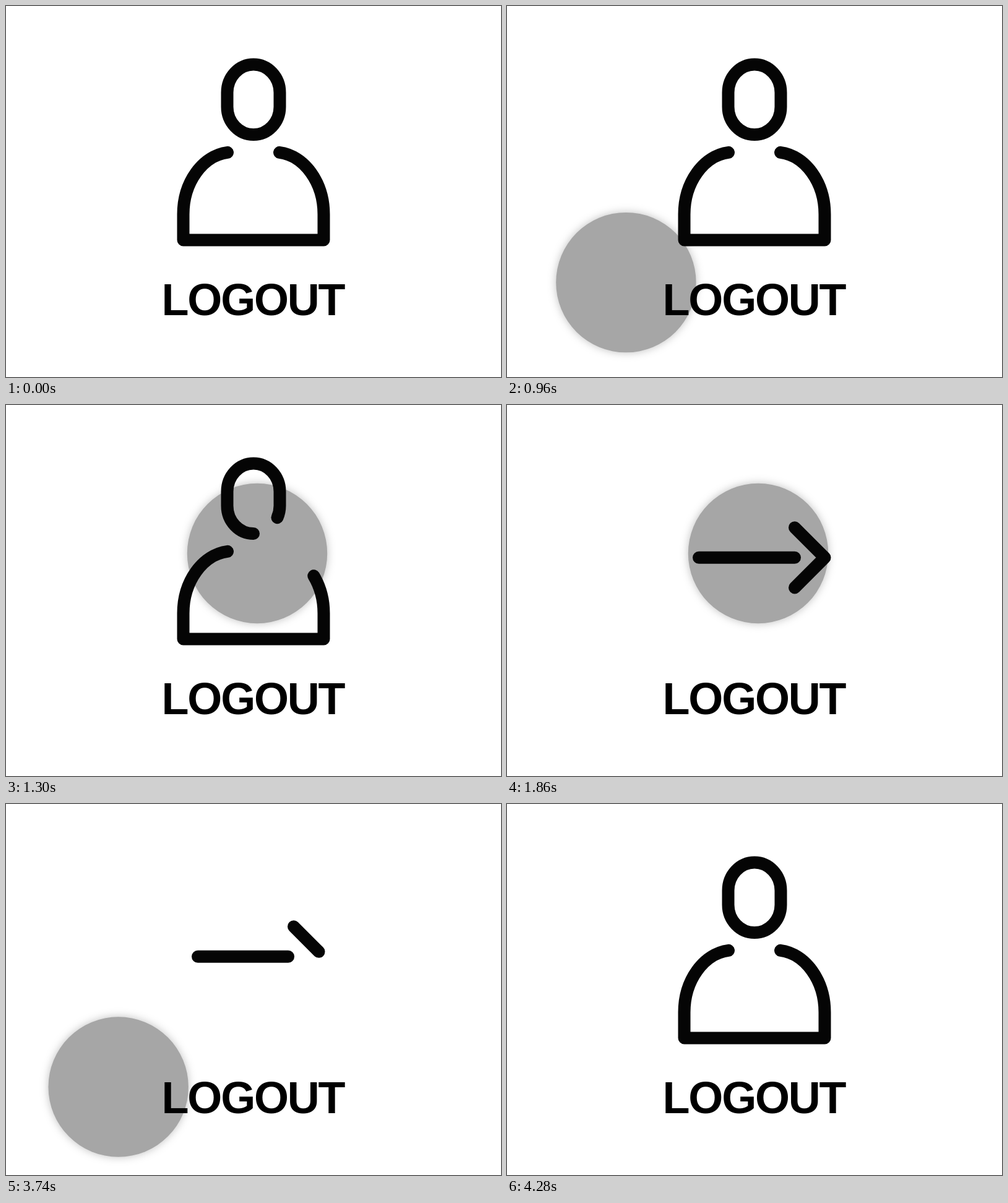
An HTML page that plays this animation: 800x600 px, repeating every 5980 ms.

```html
<!DOCTYPE html>
<html lang="en">
<head>
<meta charset="utf-8">
<title>Logout</title>
<style>
  html, body { margin: 0; width: 100%; height: 100%; overflow: hidden; background: #fff; }
  svg { display: block; width: 100vw; height: 100vh; }
  .line { fill: none; stroke: #050505; stroke-width: 20; stroke-linecap: round; stroke-linejoin: round; }
  text { font: bold 72px "Liberation Sans", Arial, Helvetica, sans-serif; letter-spacing: -2.2px; fill: #000; }
</style>
</head>
<body>
<svg viewBox="0 0 800 600">
  <defs>
    <filter id="soft" x="-25%" y="-25%" width="150%" height="150%" color-interpolation-filters="sRGB">
      <feDropShadow dx="0" dy="0" stdDeviation="7" flood-color="#000" flood-opacity=".25"/>
    </filter>
  </defs>
  <g id="disc"><circle r="113.2" fill="#a6a6a6" filter="url(#soft)"/></g>
  <path class="line" id="head" pathLength="1"
    d="M400 208A42.5 45 0 0 1 357.5 163V140A42.5 45.5 0 0 1 442.5 140V163A42.5 45 0 0 1 400 208"/>
  <path class="line" id="body" pathLength="1"
    d="M358 236.8C318 242 286.5 285 286.5 337V378.5H513.5V337C513.5 285 482 242 442 236.8"/>
  <path class="line" id="shaft" pathLength="1" d="M310 246.8H465"/>
  <path class="line" id="tip" pathLength="1" d="M465 198.2L513.5 246.8L465 295.4"/>
  <text x="251.6" y="500">LOGOUT</text>
</svg>
<script>
  const LOOP = 5980;
  const HALF = 2700; // the arrow rests around this moment
  const $ = id => document.getElementById(id);
  const disc = $('disc'), head = $('head'), body = $('body'), shaft = $('shaft'), tip = $('tip');

  const clamp = v => Math.min(1, Math.max(0, v));
  // share of a stroke that is gone, u ms away from its full state
  const gone = (u, span, power) => Math.pow(clamp(u / span), power);

  function trim(path, part) {
    path.style.visibility = part > 0.001 ? 'visible' : 'hidden';
    path.style.strokeDasharray = part >= 1 ? 'none' : part + ' 3';
  }

  function person(path, t, span) {
    const u = t < HALF ? t - 1200 : 4280 - t;
    trim(path, 1 - gone(u, span, 1.55));
  }

  function arrow(path, t, end, start, span) {
    const u = t < HALF ? end - t : t - start;
    trim(path, 1 - gone(u, span, 1.5));
  }

  function draw(t) {
    const u = Math.max(0, t < HALF ? 1136 - t : t - 3560);
    const away = 9 * Math.pow(u / 20, 1.46);
    disc.style.visibility = away < 560 ? 'visible' : 'hidden';
    disc.setAttribute('transform', `translate(${406 - away} ${240 + away * 0.9697})`);
    person(head, t, 340);
    person(body, t, 393);
    arrow(shaft, t, 1720, 3700, 275);
    arrow(tip, t, 1860, 3580, 231);
  }

  const begin = performance.now();
  function tick() {
    draw((performance.now() - begin) % LOOP);
    requestAnimationFrame(tick);
  }
  draw(0);
  requestAnimationFrame(tick);
</script>
</body>
</html>
```
